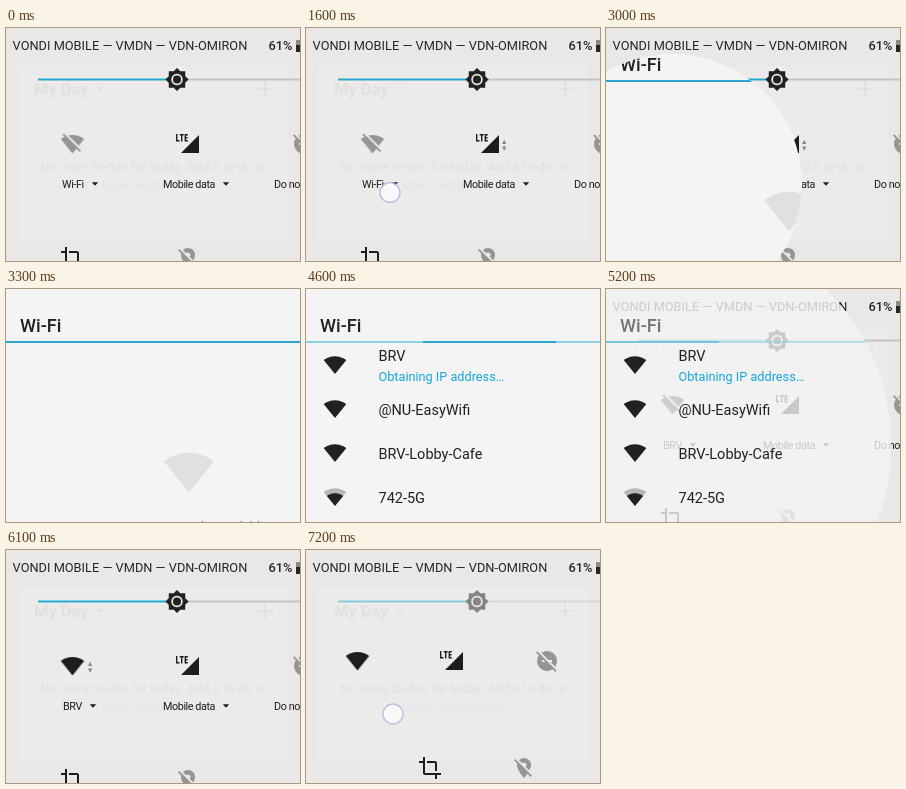
An HTML page that plays this animation: 294 px wide and 233 px high, repeating every 7.3 s.

```html
<!DOCTYPE html>
<html lang="en">
<head>
<meta charset="utf-8">
<title>Quick settings</title>
<style>
@property --p { syntax: "<number>"; inherits: true; initial-value: 0; }

html, body { margin: 0; width: 100%; height: 100%; overflow: hidden; background: #eae8e7; }
body { position: relative; font-family: Roboto, "Noto Sans", sans-serif; }
svg { display: block; position: absolute; left: 0; top: 0; }
svg, #detail { width: 294px; height: 233px; }
#detail { position: absolute; left: 0; top: 0; }

/* One 7.3 s loop for everything; 100 ms is about 1.37 % */
.anim, #panel, #detail { animation: 7.3s step-end infinite; }
#panel { animation-name: collapse; }
#detail { animation-name: reveal; }

.behind { fill: #e2e0de; }
.header { font-size: 12.8px; fill: #262626; }
.tile {
  transform: translate(calc((var(--x) + var(--p) * var(--dx)) * 1px),
                       calc((var(--y) + var(--p) * var(--dy)) * 1px));
  fill: #1d1d1d;
}
.off { fill: #979593; }
.label { font-size: 10.8px; letter-spacing: -.42px; opacity: calc(1 - var(--p) * 1.6); }
.slider { opacity: calc(1 - var(--p) * .5); }
.arrows { fill: #8a8886; }
.touch { fill: #fbfbfd; stroke: #b7b7e2; stroke-width: 1.4; }
.title { font-size: 18.2px; font-weight: 500; fill: #212121; }
.name { font-size: 14.5px; fill: #212121; }
.status { font-size: 12.7px; fill: #16a5dc; }

.lte-data { animation-name: lte-data; }
.wifi-data { animation-name: wifi-data; }
.tap { animation-name: tap; }
.hold { animation-name: hold; }
.ripple { animation-name: ripple; }
.sheet { animation-name: sheet; }
.head { animation-name: head; }
.empty { animation-name: empty; }
.list { animation-name: list; }
.lift { animation-name: lift; }
.busy { animation-name: busy; }
.segment { animation-name: segment; }
.before { animation-name: before; }
.after { animation-name: after; }
.icon-off { animation-name: icon-off; }
.icon-on { animation-name: icon-on; }

@keyframes lte-data {
  0% { opacity: 0 } 1.36% { opacity: .5 } 2.73% { opacity: 1 } 45.2%, 100% { opacity: 0 }
}
@keyframes wifi-data {
  0% { opacity: 0 } 82.19% { opacity: .5 } 83.56% { opacity: 1 } 94.52%, 100% { opacity: 0 }
}
@keyframes tap {
  0% { opacity: 0 } 21.91% { opacity: .88 } 23.28% { opacity: .6 }
  24.65% { opacity: .3 } 26.02%, 100% { opacity: 0 }
}
@keyframes hold { 0% { opacity: 0 } 89.04%, 100% { opacity: .88 } }
@keyframes ripple { 0% { opacity: 0 } 38.35% { opacity: 1 } 39.72%, 100% { opacity: 0 } }
@keyframes reveal {
  0% { clip-path: circle(0 at 66px 156px) }
  39.72% { clip-path: circle(76px at 66px 156px) }
  41.09% { clip-path: circle(130px at 66px 156px) }
  42.46% { clip-path: circle(186px at 66px 156px) }
  43.83% { clip-path: circle(244px at 66px 156px) }
  45.2% { clip-path: circle(400px at 66px 156px) }
  71.23% { clip-path: circle(219px at 66px 156px) }
  72.6% { clip-path: circle(164px at 66px 156px) }
  73.97% { clip-path: circle(109px at 66px 156px) }
  75.34% { clip-path: circle(54px at 66px 156px) }
  76.71%, 100% { clip-path: circle(0 at 66px 156px) }
}
@keyframes sheet {
  0% { opacity: 1 } 71.23% { opacity: .8 } 72.6% { opacity: .62 }
  73.97% { opacity: .46 } 75.34%, 100% { opacity: .3 }
}
@keyframes head {
  0% { opacity: 1 } 71.23% { opacity: .6 } 72.6% { opacity: .3 } 73.97%, 100% { opacity: 0 }
}
@keyframes empty { 0% { opacity: 1 } 57.53% { opacity: .5 } 58.9%, 100% { opacity: 0 } }
@keyframes list { 0% { opacity: 0 } 57.53% { opacity: .5 } 58.9%, 100% { opacity: 1 } }
@keyframes lift { 0% { transform: translateY(9px) } 63.01%, 100% { transform: none } }
@keyframes busy { 0% { opacity: 0 } 63.01%, 100% { opacity: 1 } }
@keyframes segment {
  0% { transform: translateX(117px) } 64.38% { transform: translateX(172px) }
  65.75% { transform: translateX(232px) } 67.12% { transform: translateX(-90px) }
  68.49%, 100% { transform: translateX(-20px) }
}
@keyframes before { 0% { opacity: 1 } 45.2%, 100% { opacity: 0 } }
@keyframes after { 0% { opacity: 0 } 45.2%, 100% { opacity: 1 } }
@keyframes icon-off {
  0% { opacity: 1; fill: #979593 } 45.2% { opacity: 1; fill: #333 }
  78.08% { opacity: .6; fill: #333 } 79.45% { opacity: .3; fill: #333 }
  80.82%, 100% { opacity: 0; fill: #333 }
}
@keyframes icon-on {
  0% { opacity: 0 } 78.08% { opacity: .3 } 79.45% { opacity: .65 } 80.82%, 100% { opacity: 1 }
}
@keyframes collapse {
  0% { --p: 0 } 94.52% { --p: .12 } 95.89% { --p: .36 } 97.26% { --p: .68 } 98.63%, 100% { --p: 1 }
}
</style>
</head>
<body>
<svg id="panel" viewBox="0 0 294 233">
  <defs>
    <!-- 24-unit icons, centred on the origin -->
    <g id="wifi"><path transform="translate(-12 -12)" d="M12 21.5L23.64 7c-.45-.34-4.93-4-11.64-4S.81 6.66.36 7z"/></g>
    <g id="wifi-low"><path transform="translate(-12 -12)" d="M3.53 10.95L12 21.5l8.47-10.55C20.04 10.62 16.81 8 12 8s-8.04 2.62-8.47 2.95z"/></g>
    <g id="wifi-off"><path transform="translate(-12 -12)" d="M23.64 7c-.45-.34-4.93-4-11.64-4-1.5 0-2.89.19-4.15.48L18.18 13.8 23.64 7zm-6.6 8.22L3.27 1.44 2 2.72l2.05 2.06C1.91 5.76.59 6.82.36 7L12 21.5l3.91-4.87 3.32 3.32 1.27-1.27z"/></g>
    <g id="dnd-off"><path transform="translate(-12 -12)" d="M17 11v2h-1.46l4.68 4.68A9.9 9.9 0 0 0 22 12 10 10 0 0 0 6.32 3.78L13.54 11zM2.27 2.27L1 3.54l2.78 2.78A10 10 0 0 0 17.68 20.22L20.46 23l1.27-1.27zM7 13v-2h1.46l2 2z"/></g>
    <g id="crop"><path transform="translate(-12 -12)" d="M17 15h2V7c0-1.1-.9-2-2-2H9v2h8zM7 17V1H5v4H1v2h4v10c0 1.1.9 2 2 2h10v4h2v-4h4v-2z"/></g>
    <g id="place-off"><path transform="translate(-12 -12)" d="M12 6.5a2.5 2.5 0 0 1 1.67 4.35l3.63 3.63c.98-1.86 1.7-3.8 1.7-5.48A7 7 0 0 0 6.96 4.15l3.19 3.19c.46-.52 1.11-.84 1.85-.84zm4.37 9.6L3.27 3 2 4.27l3.18 3.18C5.07 7.95 5 8.47 5 9c0 5.25 7 13 7 13s1.67-1.85 3.38-4.35L18.73 21 20 19.73z"/></g>
    <path id="lte" d="M-11.300-10v6.800h2.800M-8.300-9.300h4M-6.300-10v7.500M-.200-9.300h-2.500v6.100h2.500M-2.700-6.300h2.200" fill="none" stroke="#1d1d1d" stroke-width="1.4"/>
    <path id="caret" d="M-3.2-1.8h6.4L0 1.8z"/>
    <path id="arrows" d="M0 0l2.2-4.2L4.4 0zM0 2.4h4.4L2.2 6.8z"/>
  </defs>

  <rect width="294" height="233" fill="#eae8e7"/>
  <rect x="12" y="38" width="270" height="174" fill="#edebea"/>
  <g class="behind">
    <text x="28" y="67" font-size="16.5" font-weight="700">My Day</text>
    <use href="#caret" x="94" y="61"/>
    <path d="M251 61h16M259 53v16" stroke="#e0dfe7" stroke-width="1.6"/>
    <g font-size="12.7" text-anchor="middle">
      <text x="147.500" y="142.500">No more to-dos for today. Add a to-do or</text>
      <text x="147.500" y="161" fill="#e3e2ea">Open Suggestions</text>
    </g>
  </g>

  <g class="header">
    <text x="6.600" y="22">VONDI MOBILE — VMDN — VDN-OMIRON</text>
    <text x="262.500" y="22" font-weight="500">61%</text>
    <path d="M290 12h4v5h-4z" fill="#8d8b89"/>
    <path d="M290 17h4v7h-4z"/>
  </g>

  <g class="slider">
    <path d="M32 51.500H160" stroke="#26a9d0" stroke-width="2"/>
    <path d="M182 51.500H294" stroke="#c6c4c3" stroke-width="2"/>
    <path transform="translate(159 39.500)" fill="#212121" stroke="#212121" stroke-width=".5" stroke-linejoin="round" fill-rule="evenodd" d="M20 8.69V4h-4.69L12 .69 8.69 4H4v4.69L.69 12 4 15.31V20h4.69L12 23.31 15.31 20H20v-4.69L23.31 12zM12 18a6 6 0 1 1 0-12 6 6 0 0 1 0 12z"/>
    <circle cx="171" cy="51.500" r="4" fill="#212121"/>
  </g>

  <g class="anim ripple">
    <circle cx="66" cy="160" r="54" fill="#000" fill-opacity=".09"/>
    <circle cx="71" cy="160" r="38" fill="#000" fill-opacity=".06"/>
  </g>

  <g class="tile" style="--x:66.500;--y:116;--dx:-15;--dy:-5">
    <use class="anim icon-off" href="#wifi-off"/>
    <use class="anim icon-on" href="#wifi"/>
    <use class="anim wifi-data arrows" href="#arrows" x="15.500"/>
    <g class="label">
      <g class="anim before"><text x="-10.500" y="44">Wi-Fi</text><use href="#caret" x="22.500" y="40"/></g>
      <g class="anim after"><text x="-9.500" y="44">BRV</text><use href="#caret" x="20.500" y="40"/></g>
    </g>
  </g>
  <g class="tile" style="--x:182;--y:116;--dx:-36;--dy:-5">
    <use href="#lte"/>
    <path d="M11-9V9H-7z"/>
    <use class="anim lte-data arrows" href="#arrows" x="14"/>
    <g class="label"><text x="-25" y="44">Mobile data</text><use href="#caret" x="38" y="40"/></g>
  </g>
  <g class="tile" style="--x:298;--y:116;--dx:-57;--dy:-5">
    <use class="off" href="#dnd-off"/>
    <text class="label" x="-30" y="44">Do not disturb</text>
  </g>
  <g class="tile" style="--x:66;--y:230;--dx:58;--dy:-12"><use href="#crop"/></g>
  <g class="tile" style="--x:182;--y:230;--dx:36;--dy:-12"><use class="off" href="#place-off"/></g>

  <circle class="anim tap touch" cx="84" cy="164.500" r="10"/>
  <circle class="anim hold touch" cx="87" cy="164" r="10"/>
</svg>

<div id="detail">
  <svg viewBox="0 0 294 233">
    <rect class="anim sheet" width="294" height="233" fill="#f4f4f4"/>
    <g class="anim head">
      <text class="title" x="14" y="43">Wi-Fi</text>
      <rect y="52" width="294" height="2" fill="#2ba5cf"/>
      <g class="anim busy">
        <rect y="52" width="294" height="2" fill="#8fd0e6"/>
        <rect class="anim segment" y="52" width="133" height="2" fill="#2ba5cf"/>
      </g>
    </g>

    <g class="anim empty">
      <use href="#wifi" transform="translate(183 183) scale(2.15)" fill="#e0e0e0"/>
      <text x="183" y="241.700" font-size="12.7" text-anchor="middle" fill="#777">No Wi-Fi networks available</text>
    </g>

    <g class="anim list name">
      <use href="#wifi" transform="translate(29 76) scale(.96)"/>
      <use href="#wifi" transform="translate(29 120) scale(.96)"/>
      <use href="#wifi" transform="translate(29 164) scale(.96)"/>
      <g transform="translate(29 208) scale(.96)">
        <use href="#wifi" fill="#b6b6b6"/>
        <use href="#wifi-low"/>
      </g>
      <text class="anim lift" x="72.500" y="72">BRV</text>
      <text class="anim busy status" x="72.500" y="92">Obtaining IP address…</text>
      <text x="72.500" y="126">@NU-EasyWifi</text>
      <text x="72.500" y="170">BRV-Lobby-Cafe</text>
      <text x="72.500" y="214">742-5G</text>
    </g>
  </svg>
</div>
</body>
</html>
```
